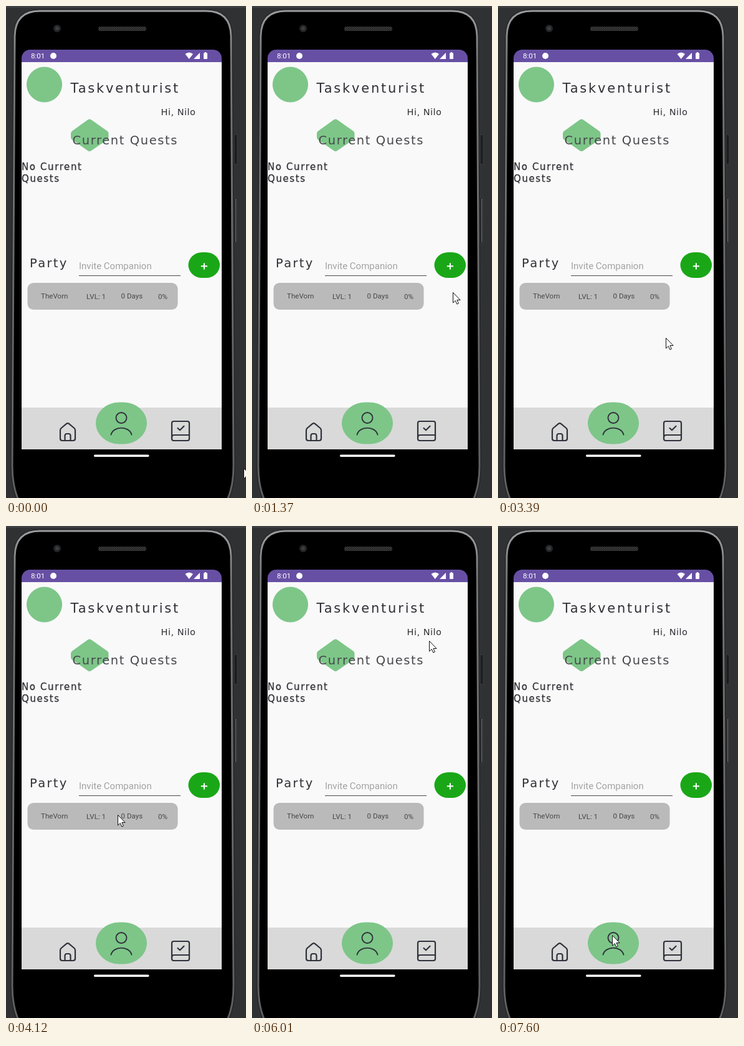
These frames come from a looping animation (385 px wide and 789 px high, 8 s). An HTML page:

```html
<!DOCTYPE html>
<html lang="en">
<head>
<meta charset="utf-8">
<title>Quest app</title>
<style>
  html, body { margin: 0; width: 100%; height: 100%; overflow: hidden; background: #303133; }
  svg { display: block; width: 100%; height: 100%; }
  .wide { font-family: "DejaVu Sans", Verdana, sans-serif; fill: #303036; }
  .ui { font-family: Roboto, Arial, sans-serif; font-size: 11.6px; fill: #48484b; }
  .icon { fill: none; stroke: #30323c; stroke-width: 2.2; stroke-linecap: round; stroke-linejoin: round; }
  .green { fill: #7dc688; stroke: #7dc688; stroke-linejoin: round; }
</style>
</head>
<body>
<svg viewBox="0 0 385 789" preserveAspectRatio="none">
  <defs>
    <linearGradient id="rim" x1="0" x2="0" y1="0" y2="1">
      <stop offset="0" stop-color="#9a9c9e"/>
      <stop offset=".1" stop-color="#737577"/>
      <stop offset="1" stop-color="#5c5e60"/>
    </linearGradient>
    <pattern id="mesh" width="3" height="3" patternUnits="userSpaceOnUse">
      <rect width="3" height="3" fill="#1b1b1b"/>
      <path d="M0 0L3 3M3 0L0 3" stroke="#4a4a4a" stroke-width=".7"/>
    </pattern>
    <path id="body" d="M24 800Q10 775 10 738L14 48Q15 8 54 8H321Q360 8 361 48L365 738Q365 775 351 800Z"/>
    <clipPath id="screen"><rect x="25" y="70" width="321" height="660" rx="14"/></clipPath>
  </defs>

  <!-- backdrop and phone -->
  <rect width="385" height="789" fill="#303133"/>
  <rect width="385" height="3" fill="#3d3f41"/>
  <g fill="#1c1d1e" stroke="#444648" stroke-width=".8">
    <rect x="366" y="206" width="5" height="48" rx="2"/>
    <rect x="366" y="307" width="4" height="74" rx="2"/>
  </g>
  <path d="M368.5 309V379" stroke="#77797a"/>
  <use href="#body" stroke="#1a1b1c" stroke-width="5"/>
  <use href="#body" stroke="url(#rim)" stroke-width="3"/>
  <circle cx="82" cy="36" r="6" fill="#242526"/>
  <circle cx="82" cy="36" r="3" fill="#3b3d40"/>
  <rect x="148" y="33" width="77" height="7" rx="3" fill="url(#mesh)"/>

  <!-- screen -->
  <g clip-path="url(#screen)">
    <rect x="25" y="70" width="321" height="20" fill="#6750a4"/>
    <rect x="25" y="90" width="321" height="554" fill="#f9f9f9"/>
    <rect x="25" y="644" width="321" height="67" fill="#d9d9d9"/>
  </g>
  <rect x="141" y="719.5" width="88.5" height="3.4" rx="1.7" fill="#fff"/>

  <!-- status bar -->
  <g fill="#fff">
    <text class="ui" x="40" y="84.2" style="fill:#fff">8:01</text>
    <circle cx="76" cy="80" r="5"/>
    <path d="M287.5 77Q293.7 72 300 77L293.7 85Z"/>
    <path d="M301 85L311 75V85Z"/>
    <rect x="317" y="75.3" width="6" height="9.7" rx="1"/>
    <rect x="318.8" y="74" width="2.4" height="2"/>
  </g>

  <!-- header -->
  <circle class="green" cx="61.5" cy="126" r="28"/>
  <path class="green" stroke-width="10" d="M134 186.5L159.500 204.500V210.500L134 228L109 210.500V204.500Z"/>
  <g class="wide">
    <text x="103.500" y="138.500" font-size="21" letter-spacing="2.8">Taskventurist</text>
    <text x="248.500" y="175" font-size="14.5" letter-spacing=".5">Hi, Nilo</text>
    <text x="106.500" y="222" font-size="19.500" letter-spacing="1.6" style="fill:#48484c">Current Quests</text>
    <g font-size="15" letter-spacing="1.6" stroke="#303036" stroke-width=".3">
      <text x="25" y="263">No Current</text>
      <text x="25" y="282">Quests</text>
    </g>
    <text x="38" y="419" font-size="19.500" letter-spacing="2.3">Party</text>
  </g>

  <!-- party -->
  <text class="ui" x="117" y="422" style="font-size:15px;fill:#a2a2a2">Invite Companion</text>
  <path d="M117 432.500H280" stroke="#4a4a4c"/>
  <rect x="292.500" y="395" width="50.500" height="41" rx="22" ry="20.500" fill="#1aa717"/>
  <path d="M312.800 417.300H323M317.900 412.200V422.400" stroke="#fff" stroke-width="2"/>
  <rect x="34.500" y="444" width="241" height="43" rx="9.500" fill="#bababa"/>
  <g class="ui">
    <text x="56" y="469">TheVorn</text>
    <text x="129" y="470">LVL: 1</text>
    <text x="184.500" y="469">0 Days</text>
    <text x="244" y="470">0%</text>
  </g>

  <!-- navigation -->
  <rect class="green" x="144.500" y="636" width="81" height="66" rx="37" ry="33"/>
  <g class="icon">
    <path d="M87 680.500Q87 678.500 88.500 677L97 669.800Q99 668.300 101 669.800L109.500 677Q111 678.500 111 680.500V693.500Q111 697 107.500 697H90.500Q87 697 87 693.500Z"/>
    <path d="M94.500 697V689.500Q94.500 686 97.500 686H100.500Q103.500 686 103.500 689.500V697"/>
    <g stroke-width="1.9">
      <circle cx="185" cy="660.500" r="8.500"/>
      <path d="M168.500 687.500C172 673 198 673 201.500 687.500"/>
    </g>
    <rect x="266" y="666" width="28" height="31" rx="3"/>
    <path d="M266 692Q266 688 270 688H294M275.500 677L279 680.300L285.500 673.800"/>
  </g>

  <path id="cursor" d="M0 0V16.500L3.800 13L6.300 18.600L8.900 17.400L6.400 12H11.600Z"
        fill="#fff" stroke="#111" stroke-linejoin="round"/>
</svg>
<script>
  const LOOP = 8000;
  const TICK = 72;
  const cursor = document.getElementById("cursor");

  // each pointer move is one curve: from, bend (control point), to
  const moves = [
    { start: 0, end: 800, from: [381, 741], bend: [310, 585], to: [292, 626] },
    { start: 880, end: 1650, from: [296, 618], bend: [372, 409], to: [273, 464] },
    { start: 1780, end: 2270, from: [272, 468], bend: [273, 490], to: [279, 524] },
    { start: 3060, end: 3660, from: [276, 526], bend: [258, 532], to: [283, 536] },
    { start: 4120, end: 4890, from: [179, 463], bend: [-35, 52], to: [120, 272] },
    { start: 4960, end: 5730, from: [121, 270], bend: [415, 110], to: [286, 178] },
    { start: 5800, end: 6290, from: [286, 177], bend: [215, 422], to: [263, 667], power: 5 },
    { start: 6490, end: 7130, from: [258, 666], bend: [135, 630], to: [183, 659] },
    { start: 7460, end: 7600, from: [183, 658], bend: [183, 657], to: [183, 656] }
  ];

  // the pointer advances in whole steps, then rests until the next move
  function progress(t, { start, end, power = 1 }) {
    const steps = Math.round((end - start) / TICK);
    const step = Math.floor((t - start) / (end - start) * steps + 1e-6);
    return Math.min(1, step / steps) ** power;
  }

  function pointerAt(t) {
    const move = moves.findLast(m => m.start <= t);
    const u = progress(t, move);
    const v = 1 - u;
    return move.from.map((a, i) => v * v * a + 2 * u * v * move.bend[i] + u * u * move.to[i]);
  }

  function draw(now) {
    const [x, y] = pointerAt(now % LOOP).map(n => Math.round(n) + 0.5);
    cursor.setAttribute("transform", `translate(${x} ${y})`);
  }

  function tick() {
    draw(performance.now());
    requestAnimationFrame(tick);
  }
  tick();
</script>
</body>
</html>
```
